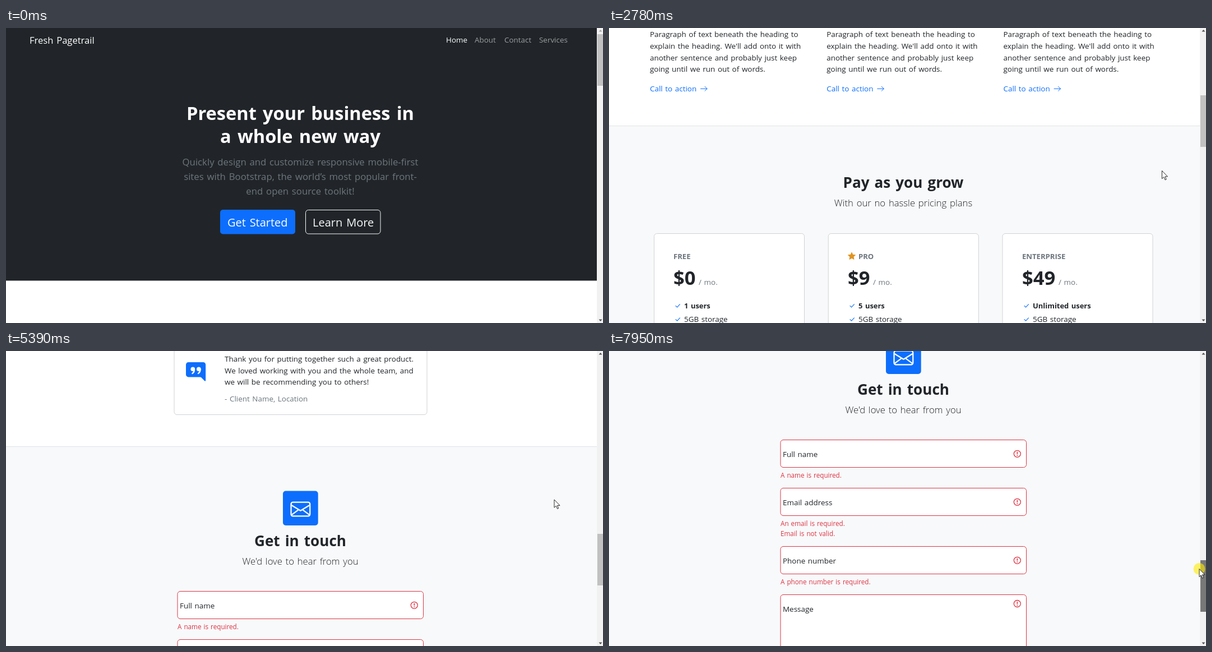
Recreate the animation shown at these times as an HTML page. Size 1065 by 526 pixels, loop 8 s.

```html
<!DOCTYPE html>
<html lang="en">
<head>
<meta charset="utf-8">
<title>Landing page scroll</title>
<style>
  html, body { margin: 0; width: 100%; height: 100%; overflow: hidden; background: #fff; }
  svg { display: block; width: 100vw; height: 100vh; }
  text { font-family: "Open Sans", "Noto Sans", sans-serif; word-spacing: .085em; }
  .b { font-size: .965em; font-weight: 700; }
</style>
</head>
<body>
<svg id="stage" viewBox="0 0 1065 526" xmlns="http://www.w3.org/2000/svg">
  <g id="page"></g>
  <g id="bar">
    <rect x="1054" width="11" height="526" fill="#f1f1f1"/>
    <path id="up" d="M1057.5 6.5h6l-3-3.5z"/>
    <path id="down" d="M1057.5 519.5h6l-3 3.5z"/>
    <rect id="thumb" x="1055" width="10" height="92"/>
  </g>
  <circle id="press" r="10.5" fill="#ffeb00" opacity=".6"/>
  <path id="cursor" d="M0 0V14.2L3.3 11.2 5.6 16.4 7.7 15.5 5.5 10.4H10Z"
        fill="#fff" stroke="#111" stroke-width=".9" stroke-linejoin="round"/>
</svg>
<script>
const INK = '#212529', GRAY = '#6c757d', BLUE = '#0d6efd', RED = '#dc3545',
      LIGHT = '#f8f9fa', LINE = '#dee2e6', EDGE = '#d0d2d4';
const MID = 525, BODY = 13.43, LOOP = 8000, MAX_SCROLL = 2386;

// ---- drawing helpers ----
const text = (x, y, str, { size = BODY, fill = INK, weight = 400, anchor = 'start' } = {}) =>
  `<text x="${x}" y="${y}" font-size="${size}" fill="${fill}" font-weight="${weight}" text-anchor="${anchor}">${str}</text>`;
const centered = (y, str, opts) => text(MID, y, str, { anchor: 'middle', ...opts });
const lines = (x, y, list, step, opts) =>
  list.map((s, i) => text(x, y + i * step, s, opts)).join('');
const box = (x, y, w, h, fill, stroke = 'none', r = 5) =>
  `<rect x="${x}" y="${y}" width="${w}" height="${h}" rx="${r}" fill="${fill}" stroke="${stroke}"/>`;
const band = (y, end, fill, border) =>
  `<rect y="${y}" width="1054" height="${end - y}" fill="${fill}"/>` +
  (border ? `<rect y="${end - 1}" width="1054" height="1" fill="${LINE}"/>` : '');
const icon = (x, y, scale, body) => `<g transform="translate(${x} ${y}) scale(${scale})">${body}</g>`;
const stroke = (d, color = '#fff', width = 1) =>
  `<path d="${d}" fill="none" stroke="${color}" stroke-width="${width}" stroke-linecap="round" stroke-linejoin="round"/>`;
const tile = (x, y, body) => box(x, y - .5, 62.7, 61.5, BLUE) + icon(x + 13.4, y + 14, 2.25, body);
const heading = (y, title, lead) =>
  centered(y, title, { size: 26.1, weight: 700 }) +
  centered(y + 32.5, lead, { size: 16.7, weight: 300 });

// ---- icons on a 16 unit grid ----
const stack = stroke('M2.5 3h11M4.5 1h7') +
  '<rect x=".5" y="5" width="15" height="9" rx="1" fill="none" stroke="#fff"/>';

function building() {
  let win = '';
  const pane = (x, y) => { win += `<rect x="${x}" y="${y}" width="1" height="1" fill="#fff"/>`; };
  for (const y of [11, 13]) for (const x of [2, 4]) pane(x, y);
  for (const y of [5, 7, 9, 11]) for (const x of [8, 10, 12]) pane(x, y);
  pane(12, 3);
  return stroke('M6.5 15.5V4.5l8-4v15h-3v-2h-2v2h-9V10l6-2') + win;
}

const toggles = '<circle cx="10" cy="4" r="4" fill="#fff"/>' +
  '<circle cx="6" cy="12" r="3.5" fill="none" stroke="#fff"/>' +
  stroke('M6.3 5.5H4a1.5 1.5 0 0 1 0-3h2.3') +
  '<path d="M9.5 10H12a2 2 0 0 1 0 4H9.5a4 4 0 0 0 0-4z" fill="#fff"/>';

const envelope = '<rect x=".5" y="2.5" width="15" height="11" rx="1.5" fill="none" stroke="#fff"/>' +
  stroke('M.7 4.8 8 9.2l7.3-4.4M.8 12.6l5.7-4.2M15.2 12.6l-5.7-4.2');

const mark = x => `<circle cx="${x}" cy="5.6" r="1.75" fill="#fff"/>` +
  stroke(`M${x + 1.25} 5.6q.1 2.5-1.7 3.5`, '#fff', 1);
const quote = `<path d="M2 0h12a2 2 0 0 1 2 2v12.8a.5.5 0 0 1-.9.3l-2.8-2.8a1 1 0 0 0-.7-.3H2a2 2 0 0 1-2-2V2a2 2 0 0 1 2-2z" fill="${BLUE}"/>` +
  mark(5.6) + mark(10.4);

const alertIcon = (x, y) =>
  `<circle cx="${x}" cy="${y}" r="6" fill="none" stroke="${RED}" stroke-width="1.3"/>` +
  stroke(`M${x} ${y - 3}v3.2`, RED, 1.5) + `<circle cx="${x}" cy="${y + 2.9}" r=".9" fill="${RED}"/>`;

function star(cx, cy, r) {
  const pts = Array.from({ length: 10 }, (_, i) => {
    const a = i * Math.PI / 5, d = i % 2 ? r * .48 : r;
    return `${cx + d * Math.sin(a)},${cy - d * Math.cos(a)}`;
  });
  return `<polygon points="${pts.join(' ')}" fill="#e09422" stroke="#e09422" stroke-linejoin="round"/>`;
}

// ---- sections, in page coordinates ----
function hero() {
  const links = [[785, 'Home', '#fff'], [836, 'About'], [889, 'Contact'], [951, 'Services']];
  return band(0, 450.5, INK) +
    text(42, 27.5, 'Fresh Pagetrail', { size: 16.6, fill: '#fff' }) +
    links.map(([x, s, c = '#9b9d9f']) => text(x, 26, s, { fill: c })).join('') +
    lines(MID, 163.5, ['Present your business in', 'a whole new way'], 41.6,
      { size: 32.6, fill: '#fff', weight: 700, anchor: 'middle' }) +
    lines(MID, 245.3, ['Quickly design and customize responsive mobile-first',
      'sites with Bootstrap, the world’s most popular front-', 'end open source toolkit!'], 26,
      { size: 16.75, fill: GRAY, anchor: 'middle' }) +
    box(382, 324, 134, 43.5, BLUE) + box(534.5, 324.5, 133.5, 42.5, 'none', LIGHT) +
    text(448.7, 354.3, 'Get Started', { size: 20, fill: '#fff', anchor: 'middle' }) +
    text(601.7, 354.3, 'Learn More', { size: 20, fill: LIGHT, anchor: 'middle' });
}

function features() {
  const copy = ['Paragraph of text beneath the heading to', "explain the heading. We'll add onto it with",
    'another sentence and probably just keep', 'going until we run out of words.'];
  return [stack, building(), toggles].map((body, i) => {
    const x = 73 + i * 315.25;
    return tile(x, 529, body) +
      text(x, 620, 'Featured title', { size: 19.4, weight: 700 }) +
      lines(x, 647, copy, 20.8) +
      text(x, 744, 'Call to action', { fill: BLUE }) +
      stroke(`M${x + 90.5} 739.3h11.5m-4-4 4 4-4 4`, BLUE);
  }).join('') + band(805, 806, LINE);
}

function plan(col, name, price, rows, open) {
  const dx = col * 311, x = 115 + dx, top = 997, solid = col === 1;
  const items = rows.map((row, i) => {
    const y = top + 129.3 + i * 24.25, on = i < open;
    return (on ? stroke(`M${x + 4} ${y}l2.6 2.6 4.8-5.2`, BLUE, 1.1)
               : stroke(`M${x + 4} ${y - 3}l6 6m0-6-6 6`, GRAY, .9)) +
      text(x + 19, y + 4.7, row, { fill: on ? INK : GRAY });
  }).join('');
  return box(80.5 + col * 310.75, top + .5, 268, 394, '#fff', EDGE) +
    (solid ? star(x + 7, top + 41, 6.8) : '') +
    text(x + (solid ? 19 : 0), top + 45.7, name, { size: 13.1, fill: GRAY, weight: 700 }) +
    text(x, top + 91.5, price, { size: 34.6, weight: 700 }) +
    text(x + (price.length > 2 ? 65 : 45), top + 91.5, '/ mo.', { fill: GRAY }) +
    items +
    box(x + .5, top + 326.5, 197.5, 32, solid ? BLUE : '#fff', BLUE) +
    text(x + 99.3, top + 348, 'Choose plan', { fill: solid ? '#fff' : BLUE, anchor: 'middle' });
}

function pricing() {
  const bold = s => `<tspan class="b">${s}</tspan>`;
  const rows = (users, domain) => [bold(users + ' users'), '5GB storage', 'Unlimited public projects',
    'Community access', 'Unlimited private projects', 'Dedicated support', domain + ' linked domain',
    'Monthly status reports'];
  return band(806, 1476, LIGHT, true) +
    heading(916, 'Pay as you grow', 'With our no hassle pricing plans') +
    plan(0, 'FREE', '$0', rows('1', 'Free'), 4) +
    plan(1, 'PRO', '$9', rows('5', 'Free'), 7) +
    plan(2, 'ENTERPRISE', '$49', rows('Unlimited', bold('Unlimited')), 7);
}

function testimonials() {
  const copy = ['Thank you for putting together such a great product.',
    'We loved working with you and the whole team, and', 'we will be recommending you to others!'];
  const card = y => box(300, y + .5, 451, 125, '#fff', EDGE) +
    icon(321, y + 32, 2.2, quote) + lines(390, y + 30.7, copy, 20.8) +
    text(390, y + 101.5, '- Client Name, Location', { fill: GRAY });
  return band(1476, 1996, '#fff', true) +
    heading(1586, 'Customer testimonials', 'Our customers love working with us') +
    card(1666) + card(1813);
}

function field(y, label, errors, h = 50) {
  return box(306, y + .5, 438.5, h - 1, '#fff', RED) +
    text(310, y + 30.5, label) +
    alertIcon(728.3, y + (h > 50 ? 16.5 : 25.3)) +
    lines(306, y + h + 18, errors, 18.2, { size: 11.7, fill: RED });
}

function contact() {
  return band(1996, 2812, LIGHT) +
    tile(494, 2075, envelope) +
    heading(2173, 'Get in touch', "We'd love to hear from you") +
    field(2253, 'Full name', ['A name is required.']) +
    field(2339, 'Email address', ['An email is required.', 'Email is not valid.']) +
    field(2443, 'Phone number', ['A phone number is required.']) +
    field(2529, 'Message', ['A message is required.'], 130) +
    stroke('M736.5 2657l6.5-6.5m-3 6.5 3-3', '#555', .8) +
    box(305.5, 2694.5, 439, 33, '#5f9ffc') +
    centered(2716, 'Submit', { fill: '#fff' }) +
    band(2811.5, 2914, INK) +
    centered(2869, 'Copyright © Your Website 2022', { fill: '#fff' });
}

const $ = id => document.getElementById(id);
$('page').innerHTML = '<rect width="1054" height="2914" fill="#fff"/>' +
  hero() + features() + pricing() + testimonials() + contact();

// ---- motion ----
const GRAB = 7480;
const scrollKeys = [[1210, 0], [2160, 303], [3400, 958], [3670, 958], [4350, 1304], [4510, 1304],
  [5380, 1825], [5540, 1825], [6290, MAX_SCROLL], [GRAB, MAX_SCROLL], [7950, 2095]];
const cursorKeys = [[70, 1033, 504], [550, 993, 246], [1210, 993, 246], [2160, 988, 253], [3400, 985, 256],
  [4360, 983, 258], [5390, 978, 265], [6360, 978, 265], [7190, 1048, 456], [7250, 1048, 456], [7320, 1053, 438.5]];

const soft = u => u - Math.sin(2 * Math.PI * u) * .04;

function at(keys, t) {
  const i = keys.findIndex(k => k[0] > t);
  if (i === 0) return keys[0].slice(1);
  if (i < 0) return keys[keys.length - 1].slice(1);
  const a = keys[i - 1], b = keys[i], u = soft((t - a[0]) / (b[0] - a[0]));
  return a.slice(1).map((v, n) => v + (b[n + 1] - v) * u);
}

function draw(t) {
  const scroll = Math.round(at(scrollKeys, t)[0]);
  const top = 11 + Math.round(scroll / MAX_SCROLL * 412);
  const held = t >= GRAB;
  let [x, y] = at(cursorKeys, t);
  if (held) y = top + 15.5;

  $('page').setAttribute('transform', `translate(0 ${-scroll})`);
  $('thumb').setAttribute('y', top);
  $('thumb').setAttribute('fill', held ? '#787878' : t >= 7320 ? '#a8a8a8' : '#c1c1c1');
  $('up').setAttribute('fill', scroll > 0 ? '#505050' : '#a3a3a3');
  $('down').setAttribute('fill', scroll < MAX_SCROLL ? '#505050' : '#a3a3a3');
  $('cursor').setAttribute('transform', `translate(${x} ${y})`);
  $('cursor').setAttribute('visibility', t < 70 ? 'hidden' : 'visible');
  $('press').setAttribute('cx', x);
  $('press').setAttribute('cy', y);
  $('press').setAttribute('visibility', held ? 'visible' : 'hidden');
}

const start = performance.now();
function tick() {
  draw((performance.now() - start) % LOOP);
  requestAnimationFrame(tick);
}
draw(0);
requestAnimationFrame(tick);
</script>
</body>
</html>
```
